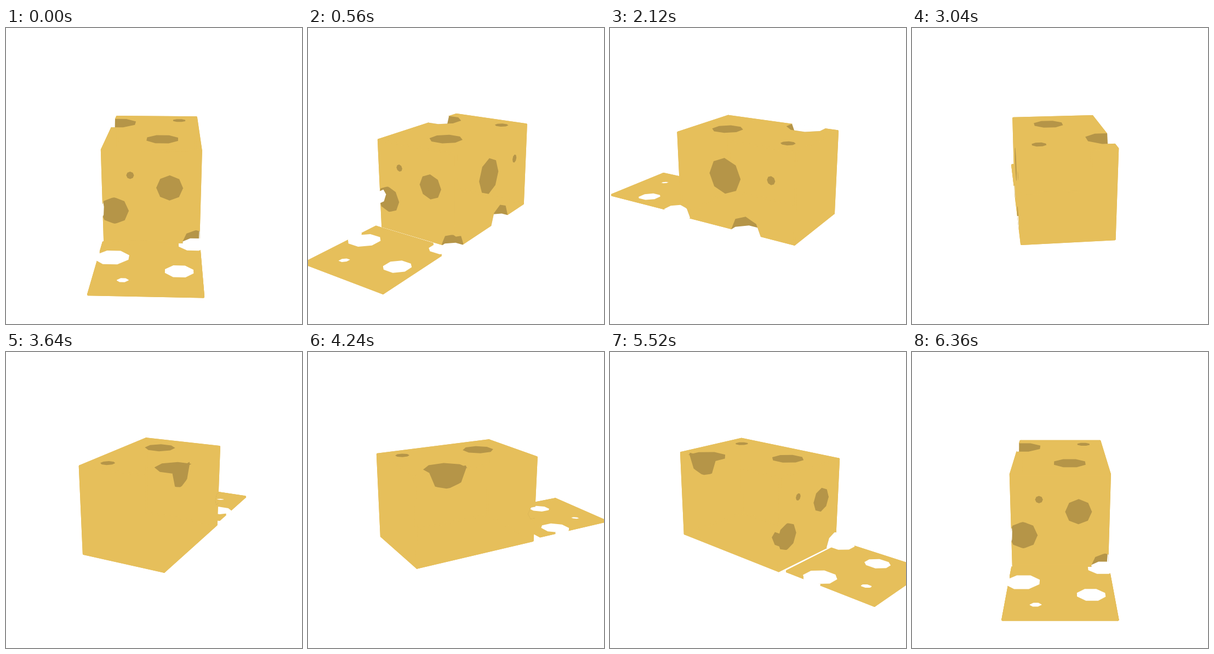
Write an HTML page with a canvas that moves like this. It is 540 px wide and 540 px high and loops after 6.4 s.

```html
<!DOCTYPE html>
<html lang="en">
<head>
<meta charset="utf-8">
<title>Turning cheese</title>
<style>
  html, body { margin: 0; width: 100%; height: 100%; overflow: hidden; background: #fff; }
  canvas { display: block; }
</style>
</head>
<body>
<canvas id="stage" width="540" height="540"></canvas>
<script>
const SIZE = 540, LOOP = 6400, STEP = 40;
const CHEESE = '#e6bf5b', HOLE = '#b59548';
const FOCAL = 1010, SIN_TILT = 0.3214, COS_TILT = 0.947;
const CENTER_X = 270.4, CENTER_Y = 270;
const CAM_HEIGHT = 3.015, CAM_DIST = 12;
const BEVEL = 0.02, BEVEL_PX = 4.2;
const MARGIN = 0.04; // openings reach a little past the edges of a face

// Points are [right, down, front], measured from the middle of the block's top.
const block = {
  min: [-1, 0, -1.5], max: [1, 2.025, 1.5],
  holes: [
    { at: [.37, .8, 1.5], r: .25 },
    { at: [-.425, .54, 1.5], r: .072 },
    { at: [-.76, 1.31, 1.48], r: .275 },
    { at: [.93, 2, 1.52], r: .265 },
    { at: [1, .81, .23], r: .375 },
    { at: [1, .705, -.92], r: .09 },
    { at: [1, 2.02, -.295], r: .35 },
    { at: [.2, 0, .69], r: .305 },
    { at: [.56, 0, -1.06], r: .135 },
    { at: [-.9, 0, -.745], r: .395 }
  ]
};

const slice = {
  min: [-1, 1.92, 1.68], max: [1, 1.965, 3.75],
  holes: [
    { at: [-.73, 1.94, 2.34], r: .315 },
    { at: [.575, 1.94, 2.85], r: .255 },
    { at: [-.44, 1.94, 3.22], r: .11 },
    { at: [.85, 1.94, 1.75], r: .27 }
  ]
};

// Outward normals of the faceted ball that carves every hole.
const FACETS = [];
for (let lat = -67.5; lat < 90; lat += 45) {
  for (let lon = 0; lon < 360; lon += 45) {
    const a = lat * Math.PI / 180, b = lon * Math.PI / 180;
    FACETS.push([Math.cos(a) * Math.cos(b), Math.sin(a), Math.cos(a) * Math.sin(b)]);
  }
}

const dot = (a, b) => a[0] * b[0] + a[1] * b[1] + a[2] * b[2];
const mix = (a, b, t) => a.map((v, i) => v + (b[i] - v) * t);

// Keeps the part of a polygon where dot(point, normal) <= limit.
function cut(shape, normal, limit) {
  const kept = [];
  shape.forEach((p, i) => {
    const q = shape[(i + 1) % shape.length];
    const dp = dot(p, normal) - limit, dq = dot(q, normal) - limit;
    if (dp <= 0) kept.push(p);
    if (dp * dq < 0) kept.push(mix(p, q, dp / (dp - dq)));
  });
  return kept;
}

// One side of a body as a rectangle, grown or shrunk within and across its plane.
function quad(body, axis, far, within, across) {
  const a = (axis + 1) % 3, b = (axis + 2) % 3;
  return [[0, 0], [1, 0], [1, 1], [0, 1]].map(([i, j]) => {
    const p = [];
    p[axis] = far ? body.max[axis] + across : body.min[axis] - across;
    p[a] = i ? body.max[a] + within : body.min[a] - within;
    p[b] = j ? body.max[b] + within : body.min[b] - within;
    return p;
  });
}

function prepare(body) {
  body.faces = [];
  for (let axis = 0; axis < 3; axis++) {
    for (const far of [false, true]) {
      const wide = quad(body, axis, far, MARGIN, 0);
      body.faces.push({
        axis, far,
        level: (far ? body.max : body.min)[axis],
        outline: quad(body, axis, far, -BEVEL, -BEVEL),
        openings: body.holes.map(({ at, r }) =>
          FACETS.reduce((shape, n) => cut(shape, n, dot(at, n) + r), wide))
      });
    }
  }
}

function project([u, d, w], turn) {
  const x = u * turn.cos - w * turn.sin;
  const z = CAM_DIST - u * turn.sin - w * turn.cos;
  const y = d + CAM_HEIGHT;
  const scale = FOCAL / (y * SIN_TILT + z * COS_TILT);
  return [CENTER_X + x * scale, CENTER_Y + (y * COS_TILT - z * SIN_TILT) * scale];
}

// All shapes wind the same way, so overlapping ones join up.
function addShape(path, shape, turn) {
  const pts = shape.map(p => project(p, turn));
  const area = pts.reduce((sum, [x, y], i) => {
    const [nx, ny] = pts[(i + 1) % pts.length];
    return sum + x * ny - nx * y;
  }, 0);
  if (area < 0) pts.reverse();
  pts.forEach(([x, y], i) => i ? path.lineTo(x, y) : path.moveTo(x, y));
  path.closePath();
}

function isVisible({ axis, far, level }, turn) {
  const cam = [CAM_DIST * turn.sin, -CAM_HEIGHT, CAM_DIST * turn.cos][axis];
  return far ? cam > level : cam < level;
}

function makeLayer() {
  const canvas = document.createElement('canvas');
  canvas.width = canvas.height = SIZE;
  return canvas.getContext('2d');
}

function drawBody(g, body, turn, holeColor) {
  g.globalCompositeOperation = 'source-over';
  g.clearRect(0, 0, SIZE, SIZE);
  g.fillStyle = g.strokeStyle = CHEESE;
  g.lineJoin = 'round';
  g.lineWidth = BEVEL_PX;
  for (const face of body.faces) {
    const path = new Path2D();
    addShape(path, face.outline, turn);
    g.fill(path);
    g.stroke(path);
  }

  const openings = body.holes.map((_, i) => {
    const near = new Path2D(), far = new Path2D();
    for (const face of body.faces) {
      const shape = face.openings[i];
      if (shape.length) addShape(isVisible(face, turn) ? near : far, shape, turn);
    }
    return { near, far };
  });

  if (holeColor) {
    g.globalCompositeOperation = 'source-atop';
    g.fillStyle = holeColor;
    for (const { near } of openings) g.fill(near);
  }

  // A hole is seen through where its near and far openings overlap.
  g.globalCompositeOperation = 'destination-out';
  for (const { near, far } of openings) {
    g.save();
    g.clip(near);
    g.fill(far);
    g.restore();
  }
}

const stage = document.getElementById('stage').getContext('2d');
const blockLayer = makeLayer(), sliceLayer = makeLayer();
let shown = -1;

function render(index) {
  const angle = (index + 1) * STEP / LOOP * 2 * Math.PI;
  const turn = { sin: Math.sin(angle), cos: Math.cos(angle) };
  drawBody(blockLayer, block, turn, HOLE);
  drawBody(sliceLayer, slice, turn);
  const layers = [blockLayer, sliceLayer];
  if (CAM_DIST * turn.cos < slice.min[2]) layers.reverse();
  stage.fillStyle = '#fff';
  stage.fillRect(0, 0, SIZE, SIZE);
  for (const layer of layers) stage.drawImage(layer.canvas, 0, 0);
}

prepare(block);
prepare(slice);

const start = performance.now();
function tick() {
  const time = Math.max(0, performance.now() - start) % LOOP;
  const index = Math.floor(time / STEP);
  if (index !== shown) render(shown = index);
  requestAnimationFrame(tick);
}
tick();
</script>
</body>
</html>
```
